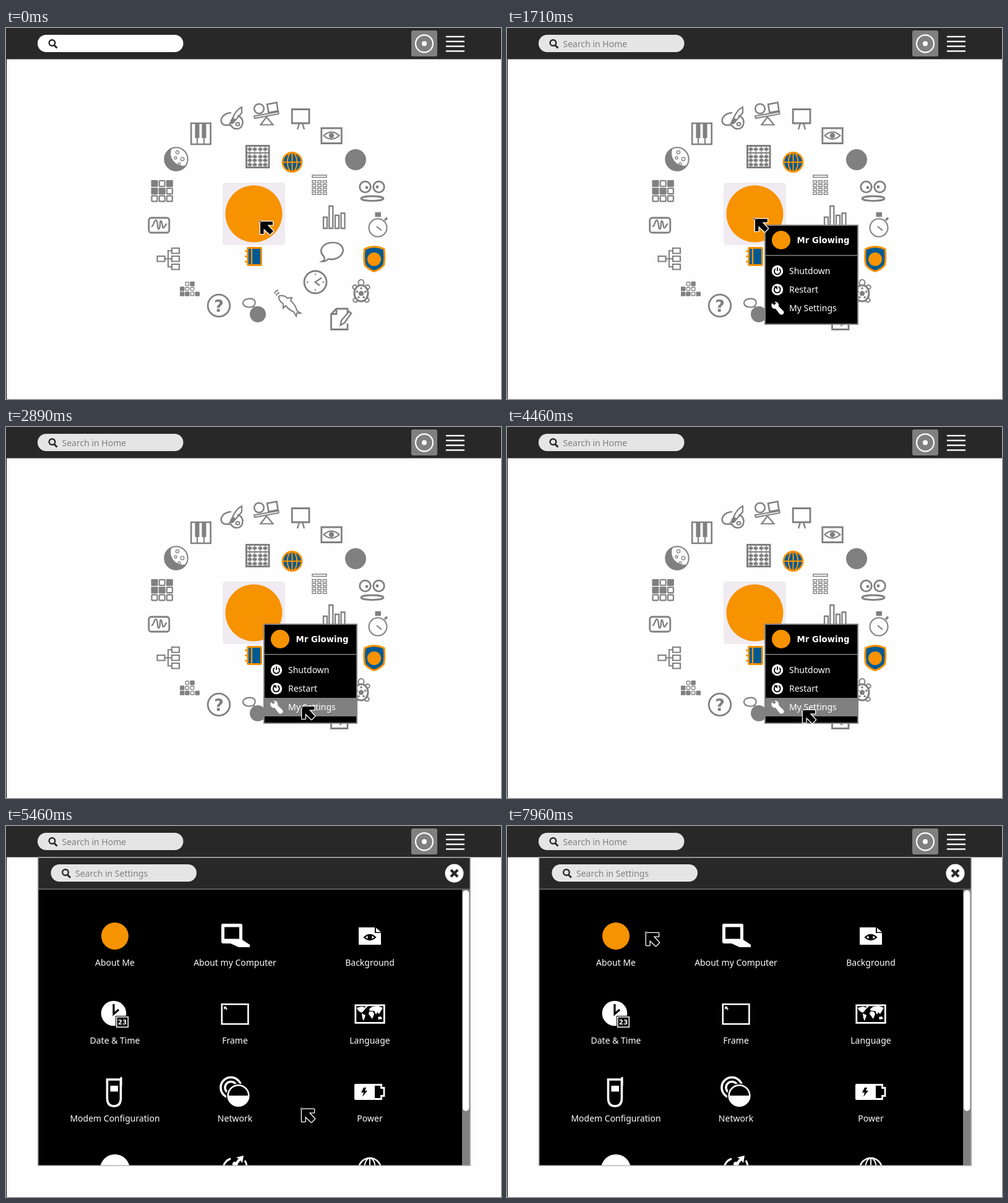
Recreate the animation shown at these times as an HTML page with a canvas. Size 800x600 px, loop 8 s.

```html
<!DOCTYPE html>
<html lang="en">
<head>
<meta charset="utf-8">
<title>Desktop settings</title>
<style>
html, body { margin: 0; width: 100%; height: 100%; overflow: hidden; background: #fefefe; }
canvas { display: block; }
</style>
</head>
<body>
<canvas id="stage" width="800" height="600"></canvas>
<script>
const ctx = document.getElementById('stage').getContext('2d');
const LOOP = 8000;
const GREY = '#808080', DARK = '#282828', BLUE = '#005a92', ORANGE = '#f79200', WHITE = '#fff', BLACK = '#000';
const SANS = '500 14px "Noto Sans", "Open Sans", sans-serif';
const BOLD = 'bold 13.33px "DejaVu Sans", sans-serif';

function paint(shape, fill, stroke, width) {
  if (fill) { ctx.fillStyle = fill; ctx.fill(shape); }
  if (stroke) { ctx.strokeStyle = stroke; ctx.lineWidth = width; ctx.stroke(shape); }
}
function path(d, fill, stroke, width = 2.5) { paint(new Path2D(d), fill, stroke, width); }
function oval(x, y, rx, ry, fill, stroke, width = 2.5) {
  const s = new Path2D();
  s.ellipse(x, y, rx, ry, 0, 0, Math.PI * 2);
  paint(s, fill, stroke, width);
}
function disc(x, y, r, fill, stroke, width) { oval(x, y, r, r, fill, stroke, width); }
function box(x, y, w, h, fill, stroke, width = 2.5, r = 0) {
  const s = new Path2D();
  s.roundRect(x, y, w, h, r);
  paint(s, fill, stroke, width);
}
function text(str, x, y, color, font = SANS, align = 'left') {
  ctx.font = font;
  ctx.textAlign = align;
  ctx.fillStyle = color;
  ctx.fillText(str, x, y);
}
// '#' is a solid cell, 'o' an outlined one
function cells(rows, x, y, size, gap, width) {
  rows.forEach((row, j) => [...row].forEach((c, i) => {
    const cx = x + i * (size + gap), cy = y + j * (size + gap);
    if (c === '#') box(cx, cy, size, size, GREY, null, 0, 1);
    if (c === 'o') box(cx + 1, cy + 1, size - 2, size - 2, null, GREY, width, 1);
  }));
}
function globe(x, y, r, fill, color, width) {
  disc(x, y, r, fill, color, width);
  oval(x, y, r * 0.5, r, null, color, width * 0.75);
  path(`M${x} ${y - r}V${y + r}M${x - r} ${y}H${x + r}`, null, color, width * 0.75);
}
function eye(x, y, w, color, pupil) {
  path(`M${x - w} ${y}Q${x} ${y - w * 0.9} ${x + w} ${y}Q${x} ${y + w * 0.9} ${x - w} ${y}Z`, null, color, 2.2);
  disc(x, y, pupil, color);
}
function search(x, y, label, fill) {
  box(x, y, 235.5, 28, fill, null, 0, 14);
  disc(x + 23.5, y + 13, 4.8, null, DARK, 2.4);
  path(`M${x + 27} ${y + 17}l4.5 4.5`, null, DARK, 3);
  if (label) text(label, x + 39.5, y + 19.5, GREY);
}

function topBar(t) {
  box(0, 0, 800, 50.5, DARK);
  const idle = t >= 790;
  search(51, 11, idle && 'Search in Home', idle ? '#e5e5e5' : WHITE);
  if (t >= 150 && !idle) box(90, 17, 1.5, 17, BLACK);
  box(655, 4, 42, 42, GREY, null, 0, 3);
  disc(676, 25.3, 14, null, WHITE, 2.2);
  disc(676, 25.3, 4, WHITE);
  for (let i = 0; i < 4; i++) box(711, 12.8 + i * 7.8, 30, 2.4, WHITE);
}

function outerRing() {
  const G = GREY;
  // piano
  box(299.2, 154, 31.5, 34, null, G, 2.6);
  box(305.5, 154, 7, 24, G); box(316.5, 154, 7, 24, G);
  path('M309 178V188M320 178V188', null, G, 2);
  // palette
  path('M364 137C351 138 345 147 349 154C353 160 360 155 364 158C369 166 380 164 382 156C384 149 380 143 374 142', null, G);
  oval(374.5, 155.5, 3, 2.6, null, G, 2);
  path('M381 128V137L371 149L366 146Q372 132 381 128Z', null, G, 2.2);
  path('M366 146C361 148 364 153 359 155C366 157 370 154 371 149Z', G);
  // balance
  disc(409, 130.5, 7.8, null, G);
  path('M422 123.5L437.5 120.5L439.5 134L424.5 137Z', null, G);
  path('M401 142.5L440.5 135.5V139L402 146Z', null, G, 2);
  path('M421 144L411.5 156.5H431.5Z', null, G, 2.2);
  // easel
  box(462.2, 131.5, 27.8, 22.5, null, G, 2.8);
  path('M474 154L471 164M479 154L482 164', null, G, 2.4);
  // framed eye
  box(509.8, 162, 32.5, 24.5, null, G, 2.8);
  eye(526, 174, 12.5, G, 4.2);
  disc(565, 213, 17, G);
  // face
  disc(580.5, 257, 8.8, null, G, 2.8); disc(602.5, 257, 8.8, null, G, 2.8);
  disc(583, 258, 2.4, G); disc(600, 257, 2.4, G);
  oval(592, 275.8, 18, 3.8, null, G, 2.8);
  // stopwatch
  disc(601, 323, 14.5, null, G, 2);
  box(596.5, 298, 9.5, 7.5, G);
  path('M612 311L616 307', null, G, 3.5);
  path('M599 321L607 327.5', null, G, 2.2);
  // shield
  path('M579.5 357.5Q595 350 611 357.5Q613 372 610.5 383.5Q604 391 595 393.5Q586 391 580 383.5Q577.5 372 579.5 357.5Z', BLUE, ORANGE, 3);
  disc(595, 374, 11, ORANGE);
  // turtle
  oval(574, 412, 4.5, 5, null, G, 2);
  for (const [x, y] of [[564, 419], [584, 419], [565, 440], [583, 440]]) oval(x, y, 3.8, 3.2, null, G, 2);
  oval(574, 429, 11, 13, '#fefefe', G, 3);
  path('M574 424.5L578.5 428L577 433H571L569.5 428Z', G);
  for (let i = 0; i < 5; i++) {
    const a = (i * 0.4 + 0.3) * Math.PI;
    disc(574 + 7 * Math.cos(a), 429 + 8 * Math.sin(a), 1.8, G);
  }
  // page and pencil
  path('M552 466V454H534L525.5 462.5V487.5H552V478M534 454V462.5H525.5', null, G, 2.8);
  path('M554.5 458.5L542 473L540.5 480.5L547 477L558 461.5Z', '#fefefe', G, 2.4);
  // dolphin
  path('M441 434C446 431 452 434 455 437L462 436L460 441C466 446 469 452 470 457L476 461L470 461L469 466L465 459C460 457 455 453 452 449L448 453L448 446C444 443 440 438 441 434Z', null, G, 2.1);
  path('M434 430Q435 425 440 424M437 433Q437 429 442 428', null, G, 1.8);
  // chat
  path('M400 450C395 453 384 452 383 445C382 438 397 435 402 441Q404 446 400 450L403 453', null, G, 2.2);
  disc(407, 463, 13, G);
  // help
  disc(344, 449, 17.8, null, G, 2.8);
  text('?', 344, 458.5, G, 'bold 27px "DejaVu Sans", sans-serif', 'center');
  cells([' o#', '#oo', '##o#'], 281, 410, 7.4, 0.8, 1.4);
  // tree
  box(244.5, 369, 12, 8.5, null, G, 2.2);
  for (const y of [356, 369, 382]) box(268, y, 12, 8.5, null, G, 2.2);
  path('M257 373.3H268M268 360.3H262V386.3H268', null, G, 2);
  // wave
  box(230.8, 307, 33, 24, null, G, 2.8, 4);
  path('M235 321C239 321 239 310 242.5 311S244 326 247 325S248 311 250.5 312S252 325 255 323S257 317 260 317', null, G, 2.4);
  cells(['#o#', '##o', 'ooo'], 234.5, 246, 11, 1.2, 2.2);
  // moon
  disc(275, 212, 18.7, null, G, 2);
  path('M268 194A19 19 0 1 0 291 222A20 20 0 0 1 268 194Z', G);
  for (const [x, y, r] of [[277, 201, 2.6], [285, 212, 2.8], [274, 210, 2], [280, 220, 2]]) disc(x, y, r, null, G, 1.3);
}

function innerRing() {
  const G = GREY;
  // abacus
  box(388.5, 190.5, 36.5, 35, null, G, 3);
  path('M388 202H425', null, G, 2);
  for (const x of [394, 402, 411, 419]) {
    path(`M${x} 190V226`, null, G, 1.3);
    for (const y of [196, 208, 214, 221]) oval(x, y, 3.6, 2.5, G);
  }
  globe(462.5, 217, 15.5, BLUE, ORANGE, 2.8);
  // calculator
  box(495, 238, 23, 3.6, null, G, 1.5);
  for (let j = 0; j < 4; j++)
    for (let i = 0; i < 3; i++) box(495 + i * 8.7, 246.8 + j * 6.2, 5.6, 3.8, null, G, 1.4);
  // bars
  for (const [x, y] of [[513, 306], [522.3, 288], [532, 303], [541.5, 299.5]]) box(x, y, 6, 324 - y, null, G, 2.3);
  // speech bubble
  path('M511 377.5Q517 375 514 370C503 359 513 347 528 347C543 347 548 358 542.5 366C537 374 527 375 521 373.5Q517 378 511 377.5Z', null, G, 2.6);
  // clock
  disc(500, 411, 18, null, G, 2.8);
  path('M510 404L499.5 411L507 416.5', null, G, 2.3);
  path('M500 397V399.5M500 422.5V425M486 411H488.5M511.5 411H514', null, G, 2);
}

function home(t) {
  ctx.fillStyle = '#fefefe';
  ctx.fillRect(0, 0, 800, 600);
  box(0, 50, 1, 550, BLACK);
  outerRing();
  innerRing();
  box(350, 250, 101, 101, t >= 790 && t < 970 ? '#b3b1b4' : '#f0ebf0', null, 0, 5);
  disc(400.5, 300.5, 46, ORANGE);
  // journal
  box(390.5, 355.5, 22, 28, BLUE, ORANGE, 2.8, 1);
  path('M397 355V384M386 361H391M386 369.5H391M386 378H391', null, ORANGE, 2.4);
}

function menu(t, row) {
  if (t < 970) return box(416, 318, 152, 50, BLACK);
  box(416, 318, 152, 162, BLACK);
  box(417, 319, 150, 160, null, GREY, 2);
  if (t < 1040) return;
  box(418, 367, 149, 1.5, GREY);
  if (row >= 0) box(418, 378 + row * 30, 149, 30, GREY);
  disc(443, 343, 15, ORANGE);
  text('Mr Glowing', 468.5, 347.5, WHITE, BOLD);
  ['Shutdown', 'Restart', 'My Settings'].forEach((s, i) => text(s, 456, 398 + i * 30, WHITE));
  disc(437, 393, 9.2, WHITE);
  path('M434 389.5A5 5 0 1 0 440 389.5M437 387V393', null, BLACK, 1.8);
  disc(437, 423, 9.2, WHITE);
  path('M434 419A5 5 0 1 0 439 418.7', null, BLACK, 1.9);
  path('M431 417.5H437V423Z', BLACK);
  path('M428 445L432 448L435 445L432 443C437 442 440 446 439 450L447 458C449 462 445 465 441 463L434 454C429 455 426 450 428 445Z', WHITE);
}

function settingsRow() {
  disc(176, 178, 22, ORANGE);
  // computer
  path('M350 158H379Q382 158 382 161V184L394 192V196H376L363 190H351Q348 190 348 187V161Q348 158 350 158Z', WHITE);
  box(353, 163.5, 24, 19, BLACK);
  // background
  path('M570 164H596V173H606V192H570ZM598 164.5L606 171.5H598Z', WHITE);
  eye(588, 180, 9, BLACK, 3.6);
}
function dateRow() {
  disc(174, 303, 20.3, WHITE);
  path('M174 288V304L182 297', null, BLACK, 3.2);
  box(177, 307, 22, 20, BLACK);
  box(178.8, 308.8, 18.5, 16.5, BLACK, WHITE, 1.6);
  text('23', 188, 321, WHITE, 'bold 10.5px "DejaVu Sans", sans-serif', 'center');
  // frame
  box(348.8, 288.2, 42.6, 32, null, WHITE, 2.6);
  path('M352 292H357L355.5 293.5L358 296L356.5 297.5L354 295L352 297Z', WHITE);
  // world map
  box(564.8, 289.8, 46.5, 28.5, BLACK, WHITE, 2.8);
  path('M567 294L575 292L582 294L578 299L575 302L571 300L568 297ZM575 303L581 306L578 315L576 311Z', WHITE);
  path('M580 291H585L582 295ZM587 300L593 300L595 304L592 312L589 308L586 304Z', WHITE);
  path('M587 296L592 292L601 291L609 294L606 299L603 304L600 301L598 305L595 299L588 299ZM601 309L606 308L608 312L602 313Z', WHITE);
}
function modemRow() {
  path('M163.5 410H185.5V440Q185.5 453 174.5 453T163.5 440Z', null, WHITE, 3.6);
  path('M186 406V420', null, WHITE, 3);
  box(168.5, 420, 12.5, 9.5, WHITE);
  // network
  for (const r of [16.5, 9.5]) disc(363.5, 423, r, null, WHITE, 3.6);
  disc(375.5, 436, 19.8, BLACK);
  disc(375.5, 436, 16.8, null, WHITE, 2.6);
  path('M358 436H393A17.5 17.5 0 0 1 358 436Z', WHITE);
  // battery
  box(563, 417, 33, 26, WHITE, null, 0, 2);
  path('M595 418.5H606.5V423.5H611V436.5H606.5V441.5H595', null, WHITE, 2.8);
  path('M578 423L582 423L580 428H584L576 438L578 431H574Z', BLACK);
}
function lowerRow() {
  disc(176, 555, 24, WHITE);
  path('M351 552A19 19 0 0 1 363 538M386 541A19 19 0 0 1 389 552', null, WHITE, 3);
  path('M372 536L384 533L382 545L379 541Q374 546 374 550L371 546Q372 541 376 538Z', WHITE);
  disc(370, 547, 4, WHITE);
  globe(588, 555, 18, BLACK, WHITE, 2.6);
}

function settings(t) {
  const ready = t >= 5460;
  box(51, 50, 700, 500, ready ? BLACK : '#bebebe');
  box(52, 51, 698, 51, DARK);
  search(72.5, 62, 'Search in Settings', '#e5e5e5');
  disc(724.5, 76.5, 15, WHITE);
  path('M719 71L730 82M730 71L719 82', null, DARK, 4.2);
  if (!ready) {
    box(51, 50, 700, 1.5, '#bebebe');
    box(51, 102, 483, 1, '#bebebe');
    box(52, 103, 482, 4, BLACK);
    box(534, 86, 217, 20, '#bebebe');
    return;
  }
  box(52, 101.5, 698, 1.2, GREY);
  ctx.save();
  ctx.beginPath();
  ctx.rect(52, 103, 685, 446);
  ctx.clip();
  settingsRow();
  dateRow();
  modemRow();
  lowerRow();
  ctx.restore();
  [['About Me', 'About my Computer', 'Background'], ['Date & Time', 'Frame', 'Language'],
    ['Modem Configuration', 'Network', 'Power']].forEach((row, j) =>
    row.forEach((s, i) => text(s, [176, 370, 588][i], 226 + j * 126, WHITE, SANS, 'center')));
  box(737, 103, 13, 446, GREY);
  box(738.3, 104, 10, 357, WHITE, null, 0, 5);
  box(51.8, 50.8, 698.4, 498.4, null, '#b8b8b8', 1.4);
}

// pointer moves: start, end, steps, cubic control points
const MOVES = [
  [1710, 2440, 10, [[411, 313], [360, 285], [496, 404], [476, 404]]],
  [2520, 2970, 6, [[476, 404], [477, 415], [479, 450], [478, 458]]],
  [6000, 6790, 10, [[478, 458], [476.7, 325], [453.7, 251], [409, 235]]],
  [6880, 7600, 9, [[409, 235], [370, 235], [300, 190], [273, 175]]],
  [7690, 7960, 4, [[273, 175], [258, 174], [240, 173], [225, 173]]]
];
function cubic(p, u) {
  const v = 1 - u;
  return [0, 1].map(i => v * v * v * p[0][i] + 3 * v * v * u * p[1][i] + 3 * v * u * u * p[2][i] + u * u * u * p[3][i]);
}
function pointer(t) {
  const last = MOVES.filter(m => t >= m[0]).pop();
  if (!last) return { tip: MOVES[0][3][0], dot: MOVES[0][3][0] };
  const [start, end, n, pts] = last;
  const k = Math.floor((t - start) / ((end - start) / (n - 1)) + 1e-6) + 1;
  const u = Math.min(1, k / n);
  return { tip: cubic(pts, u), dot: cubic(pts, Math.min(1, u + 0.03)) };
}
function drawPointer({ tip, dot }, pressed) {
  const arrow = 'M0 0H20V5.5H11.5L21 15.5L15.5 21L5.5 11.5V20H0Z';
  ctx.save();
  ctx.lineJoin = 'round';
  ctx.translate(...tip);
  path(arrow, null, WHITE, 2.6);
  path(arrow, BLACK);
  ctx.restore();
  disc(dot[0] - 0.5, dot[1] - 0.5, 1.5, BLACK, WHITE, 0.9);
  if (pressed) disc(tip[0], tip[1], 6.5, null, WHITE, 1.5);
}

function draw(t) {
  const p = pointer(t);
  home(t);
  topBar(t);
  if (t >= 5380) settings(t);
  else if (t >= 790) menu(t, p.tip[1] < 378 ? -1 : Math.floor((p.tip[1] - 378) / 30));
  drawPointer(p, (t >= 420 && t < 510) || (t >= 4280 && t < 4460));
}

const begin = performance.now();
function tick() {
  draw((performance.now() - begin) % LOOP);
  requestAnimationFrame(tick);
}
tick();
</script>
</body>
</html>
```
